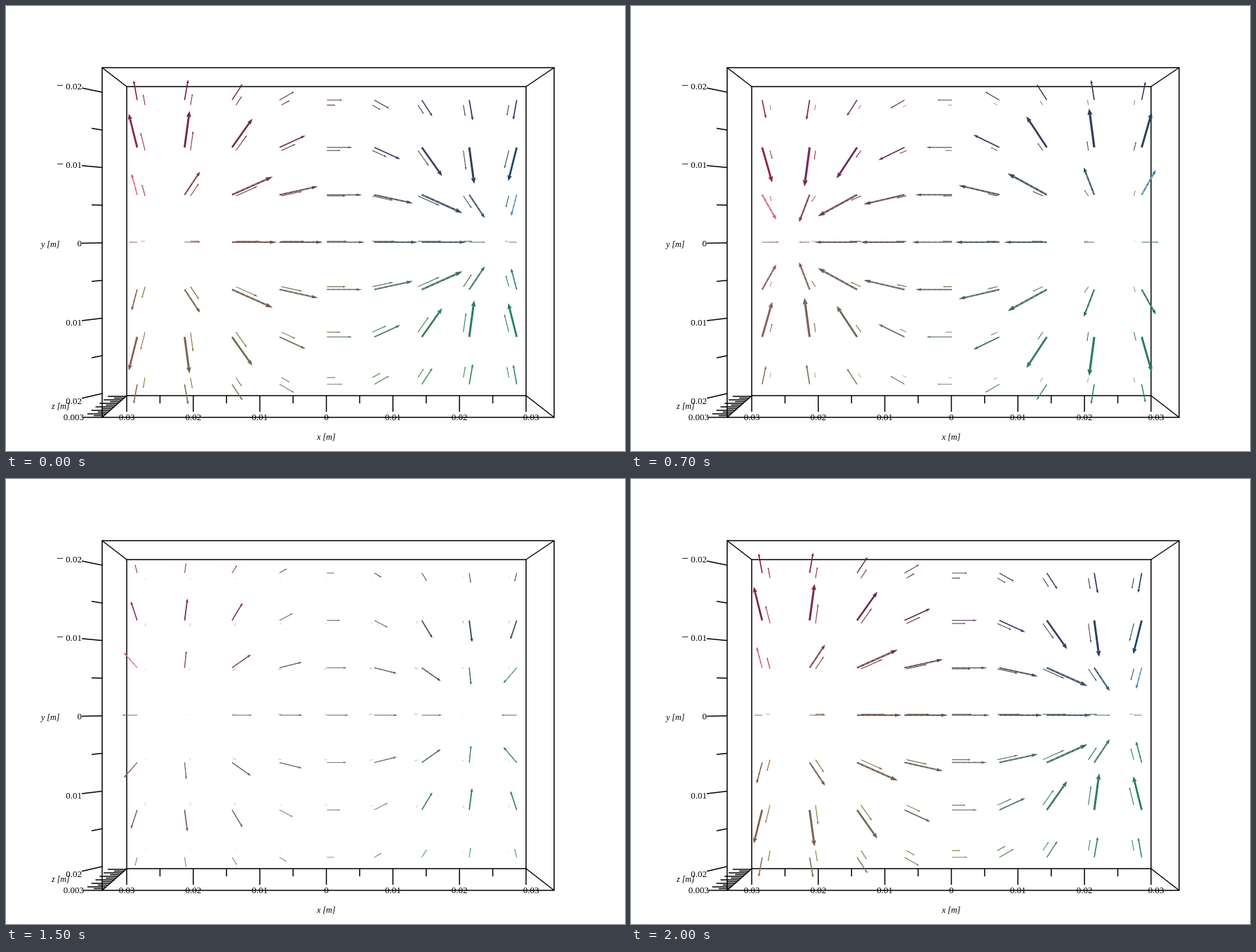
Animation, 882 px wide and 635 px high, one loop 2.1 s. Source, as an HTML page with a canvas:

```html
<!DOCTYPE html>
<html lang="en">
<head>
<meta charset="utf-8">
<title>Oscillating vector field</title>
<style>
html, body { margin: 0; width: 100%; height: 100%; overflow: hidden; background: #fff; }
canvas { display: block; }
</style>
</head>
<body>
<canvas id="stage" width="882" height="635"></canvas>
<script>
const ctx = document.getElementById('stage').getContext('2d');

// Upper-left quadrant, rows outward from the axis, columns outward from the centre:
// [x cosine, x sine, y cosine, y sine]
const FIELD = [
  [[54, -31, 0, 0], [62, -33, 0, 0], [64, -29, 0, 0], [23, -2, 0, 0], [-11, 22, 0, 0]],
  [[50, -28, 0, 0], [55, -32, -12, 8], [58, -27, -26, 19], [22, -2.5, -33, 24], [-8, 19, -30, 22]],
  [[36, -19, 0, 0], [37, -19, -17, 10], [29, -15, -41, 25], [7, -4, -52, 31], [-12, 9, -48, 27]],
  [[22, -10, 0, 0], [21, -10, -12, 6], [15, -7, -23, 11], [5, -2, -29, 14], [-5, 3, -28, 12]]
];

const rgb = (...c) => `rgb(${c.map(v => Math.max(0, Math.min(255, Math.round(v)))).join()})`;

function line(x1, y1, x2, y2) {
  ctx.beginPath();
  ctx.moveTo(x1, y1);
  ctx.lineTo(x2, y2);
  ctx.stroke();
}

function text(s, x, y, align = 'center', font = '13px') {
  ctx.font = `${font} "Liberation Serif", "Times New Roman", serif`;
  ctx.textAlign = align;
  ctx.fillText(s, x, y);
}

function drawAxes() {
  ctx.strokeStyle = ctx.fillStyle = '#000';
  ctx.lineWidth = 1.5;
  ctx.strokeRect(137, 88, 644, 499);
  ctx.strokeRect(172, 115, 569, 441);
  line(137, 88, 172, 115);
  line(781, 88, 741, 115);
  line(781, 587, 741, 556);
  line(137, 587, 172, 556);

  for (let k = 0; k <= 12; k++) {
    const x = 172 + k * 569 / 12;
    line(x, 556, x, k % 2 ? 567 : 579);
    if (k % 2 === 0) text(k === 6 ? '0' : '0.0' + Math.abs(k - 6) / 2, k === 12 ? 748 : x, 591);
    const z = k / 12;
    line(137 + 35 * z, 587 - 30 * z, (k % 2 ? 122 : 110) + 35 * z, 587 - 30 * z);
  }

  ['\u2212 0.02', '\u2212 0.01', '0', '0.01', '0.02'].forEach((label, k) => {
    const y = 123 + 107.5 * k;
    line(108, y - 6 + 3.2 * k, 137, y);
    text(label.replace('\u2212 ', ''), 108, 119 + 112.2 * k, 'right');
    if (k < 2) text('\u2212', 72, 119 + 112.2 * k, 'left', '18px');
    if (k < 4) line(122, 174.5 + 109.2 * k, 137, 177 + 107.3 * k);
  });
  text('0.003', 111, 591, 'right');
  text('y [m]', 50, 344, 'left', 'italic 12px');
  text('z [m]', 65, 575, 'left', 'italic 12px');
  text('x [m]', 443, 619, 'left', 'italic 12px');
}

function arrow(x, y, dx, dy, width, color, glow) {
  const len = Math.hypot(dx, dy);
  if (len < 1.5) return;
  const head = len * .16;
  const half = Math.max(.8, width * 1.15);
  ctx.save();
  ctx.globalAlpha = Math.min(1, len / 12);
  ctx.translate(x, y);
  ctx.rotate(Math.atan2(dy, dx));
  ctx.strokeStyle = ctx.fillStyle = color;
  ctx.lineWidth = width;
  line(0, 0, len - head, 0);
  ctx.beginPath();
  ctx.moveTo(len, 0);
  ctx.lineTo(len - head, -half);
  ctx.lineTo(len - head, half);
  ctx.fill();
  if (glow) {
    ctx.strokeStyle = `rgba(255,255,255,${glow})`;
    ctx.lineWidth = width * .4;
    ctx.setLineDash([5, 3]);
    line(2, 0, len - head, 0);
  }
  ctx.restore();
}

function drawLayer(front, phase) {
  const c = Math.cos(phase), s = Math.sin(phase);
  const step = front ? 67.6 : 64.8;
  for (let j = -3; j <= 3; j++) for (let i = -4; i <= 4; i++) {
    const row = Math.abs(j), col = Math.abs(i);
    const [xc, xs, yc, ys] = FIELD[row][col];
    const flip = (i > 0 ? -1 : 1) * (j > 0 ? -1 : 1);
    const wave = (a, b) => front ? a * c + b * s : .54 * a * (c + .15 * s);
    const dx = wave(xc, xs), dy = flip * wave(yc, ys);
    const len = Math.hypot(dx, dy);
    const tint = 11 * i * Math.cos(phase - .7) / (1 + row * row / 3);
    const bright = front && col === 4 && j === -1 ? 1.6 : 1;
    const color = rgb(
      (84 - 13 * i) * bright,
      (82 + 15 * j + 4 * i) * bright,
      ((front ? 88 : 55) + tint) * bright
    );
    const width = front ? Math.max(.9, .03 * len + .026 * Math.abs(dy)) : 1;
    const glow = front && row < 2 && len > 20 ? (bright > 1 ? .6 : .35) : 0;
    arrow(457.3 + step * i, (front ? 337 : 335.8) + step * j, dx, dy, width, color, glow);
  }
}

function frame(now) {
  const phase = Math.floor(now % 2100 / 100) * Math.PI / 10;
  ctx.fillStyle = '#fff';
  ctx.fillRect(0, 0, 882, 635);
  drawAxes();
  drawLayer(false, phase);
  drawLayer(true, phase);
  requestAnimationFrame(frame);
}
frame(0);
</script>
</body>
</html>
```
